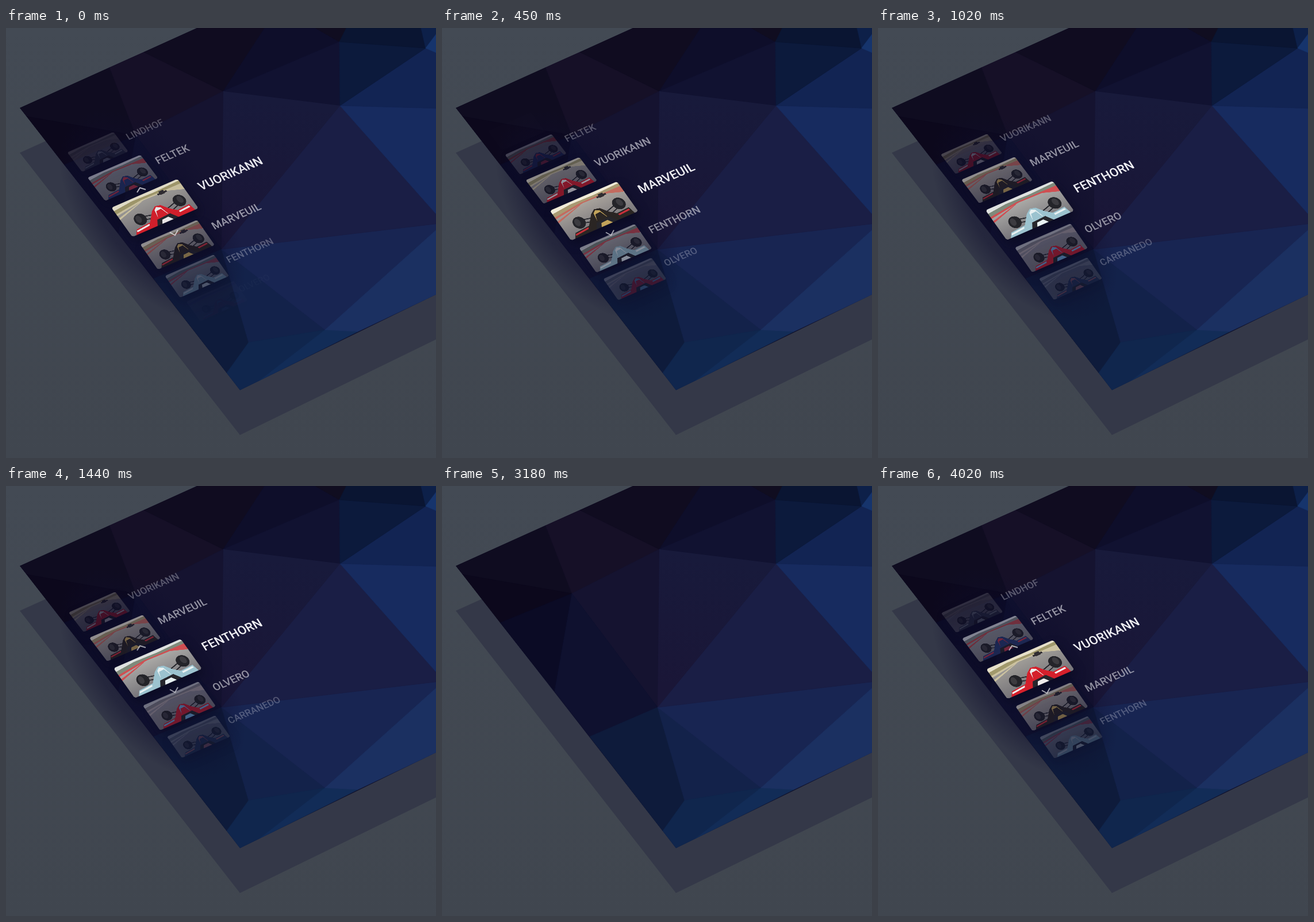
These frames come from a looping animation (748 px wide and 748 px high, 4.05 s). An HTML page with a canvas:

```html
<!DOCTYPE html>
<html lang="en">
<head>
<meta charset="utf-8">
<title>Driver picker</title>
<style>
  html, body { margin: 0; width: 100%; height: 100%; overflow: hidden; background: #414850; }
  canvas { display: block; width: 100vw; height: 100vh; }
</style>
</head>
<body>
<canvas id="stage" width="748" height="748"></canvas>
<script>
const SIZE = 748, LOOP = 4050, STEP = 30;
const ctx = document.getElementById('stage').getContext('2d');

// Corners of the low-poly backdrop
const P = {
  A: [24, 139], B: [332, 0], C: [180, 68], D: [240, 42], E: [226, 187],
  F: [378, 110], G: [450, 0], H: [580, 24], I: [581, 135], J: [730, 35],
  K: [762, 339], L: [375, 385], M: [101, 238], N: [196, 357], O: [257, 436],
  P: [422, 547], Q: [384, 600], R: [407, 630], S: [555, 525], T: [612, 528],
  U: [440, 614], V: [760, 458], W: [760, 140], X: [592, 0], Y: [722, 0],
  Z: [760, -5], a: [538, 0], b: [36, 154], c: [760, 48]
};
const FACETS = [
  ['ACEb', '#0f0c20'], ['bEM', '#0c081c'], ['CDFE', '#161027'], ['DBGF', '#100c20'],
  ['GaHF', '#0e0e2a'], ['aXH', '#100d20'], ['FHI', '#111231'], ['EFL', '#151330'],
  ['MEN', '#0b0b25'], ['ELON', '#0f112f'], ['OLPQ', '#0e1b3b'], ['LSP', '#13224a'],
  ['PSURQ', '#10264d'], ['UST', '#122c57'], ['LSK', '#182552'], ['ILK', '#1a1e45'],
  ['SKVT', '#1b3061'], ['IWK', '#172b5f'], ['IJcW', '#122453'], ['HJI', '#0c1a3c'],
  ['HXYJ', '#0a1532'], ['YZJ', '#0d2049'], ['JZc', '#16346c']
];

const DRIVERS = [
  { name: 'LINDHOF', sky: '#8a8a92', trees: '#5d5f68', band: '#77777c', road: '#66666d', car: '#3c4450', trim: '#8b969d' },
  { name: 'FELTEK', sky: '#d3d6dc', trees: '#7b8180', band: '#b4474a', road: '#8b8e94', car: '#26386f', trim: '#b8364a' },
  { name: 'VUORIKANN', sky: '#e9e3cc', trees: '#a39b6d', band: '#cfc5a2', road: '#a19e99', car: '#d8202b', trim: '#f2eeee', rival: 1 },
  { name: 'MARVEUIL', sky: '#f1ecd9', trees: '#a99a72', band: '#c46b5f', road: '#aaa49d', car: '#2a2523', trim: '#c3a45a', wing: '#c6303a', rival: 1 },
  { name: 'FENTHORN', sky: '#dfe2e0', trees: '#7f8a7b', band: '#cf4f52', road: '#aaa9a6', car: '#9cc3cf', trim: '#e8f1f2' },
  { name: 'OLVERO', sky: '#c5c7cc', trees: '#807f83', band: '#a99fa0', road: '#898790', car: '#c2202f', trim: '#6aa5d6' },
  { name: 'CARRANEDO', sky: '#b9bcc4', trees: '#777b83', band: '#a5a5aa', road: '#7d7f88', car: '#303d5e', trim: '#b9686c' }
];

// One entry per slot from -3 to 3: card corner, card axes, text start, type size, opacities
const SLOTS = [
  [81, 179, 73, -32, 23, 32, 172, 164, 15.6, 0, 0],
  [109, 220, 81, -36, 26, 34, 217, 198, 16.7, .27, .32],
  [145, 264, 93, -40, 31, 41, 269, 241, 18.4, .58, .58],
  [187, 317, 117, -51, 37, 52, 346, 287, 21.5, 1, 1],
  [238, 382, 97, -42, 30, 43, 364, 357, 18.4, .56, .56],
  [280, 436, 84, -37, 26, 37, 390, 414, 16.6, .27, .28],
  [317, 480, 82, -36, 24, 33, 410, 464, 15.6, 0, 0]
];

const clamp = x => Math.max(0, Math.min(1, x));
const ramp = (t, a, b) => clamp((t - a) / (b - a));
const easeOut = (p, n = 2) => 1 - Math.pow(1 - p, n);

function poly(c, pts, fill) {
  c.beginPath();
  pts.forEach(([x, y]) => c.lineTo(x, y));
  c.closePath();
  c.fillStyle = fill;
  c.fill();
}

function oval(c, x, y, rx, ry, fill, turn = 0) {
  c.beginPath();
  c.ellipse(x, y, rx, ry, turn, 0, Math.PI * 2);
  c.fillStyle = fill;
  c.fill();
}

function layer(w, h) {
  const cv = document.createElement('canvas');
  cv.width = w;
  cv.height = h;
  return [cv, cv.getContext('2d')];
}

function paintBackdrop() {
  const [cv, c] = layer(SIZE, SIZE);
  const wall = c.createLinearGradient(0, 0, 0, SIZE);
  wall.addColorStop(0, '#434a54');
  wall.addColorStop(1, '#40464f');
  c.fillStyle = wall;
  c.fillRect(0, 0, SIZE, SIZE);

  const sheet = [P.A, P.B, [760, -193], P.V, P.R];
  poly(c, sheet.map(([x, y]) => [x, y + 78]), '#343848');

  c.save();
  c.beginPath();
  sheet.forEach(([x, y]) => c.lineTo(x, y));
  c.clip();
  poly(c, sheet, '#10112c');
  for (const [keys, color] of FACETS) {
    poly(c, [...keys].map(k => P[k]), color);
    c.strokeStyle = color;
    c.lineWidth = .8;
    c.stroke();
  }
  const mid = c.createLinearGradient(440, 120, 400, 350);
  mid.addColorStop(0, '#181a3b');
  mid.addColorStop(1, '#1a1637');
  poly(c, [P.F, P.I, P.L], mid);
  c.restore();
  return cv;
}

// Soft flat onboard view, 320 by 180
function paintCard(d) {
  const [cv, c] = layer(320, 180);
  c.beginPath();
  c.roundRect(0, 0, 320, 180, 11);
  c.clip();
  c.fillStyle = d.sky;
  c.fillRect(0, 0, 320, 180);
  poly(c, [[0, 22], [90, 12], [200, 15], [320, 10], [320, 45], [0, 45]], d.trees);
  poly(c, [[0, 42], [130, 25], [320, 27], [320, 60], [0, 60]], d.band);
  const road = c.createLinearGradient(0, 30, 0, 180);
  road.addColorStop(0, d.road);
  road.addColorStop(1, '#77757a');
  poly(c, [[0, 52], [140, 31], [250, 34], [320, 62], [320, 180], [0, 180]], road);
  poly(c, [[0, 66], [122, 33], [128, 34], [0, 76]], d.band);
  if (d.rival) {
    c.fillStyle = '#302d31';
    c.fillRect(204, 29, 44, 9);
    c.fillRect(215, 21, 22, 20);
  }

  // Suspension, tyres and nose
  c.strokeStyle = '#24252b';
  c.lineWidth = 5;
  c.beginPath();
  [[82, 104, 150, 122], [84, 122, 145, 142], [268, 98, 200, 120], [268, 118, 204, 142]]
    .forEach(([x, y, X, Y]) => { c.moveTo(x, y); c.lineTo(X, Y); });
  c.stroke();
  oval(c, 76, 114, 27, 32, '#242429', .1);
  oval(c, 70, 110, 12, 20, '#3c3b40', .1);
  oval(c, 270, 105, 27, 32, '#242429', -.1);
  oval(c, 275, 101, 12, 20, '#3c3b40', -.1);
  poly(c, [[20, 180], [36, 154], [104, 148], [140, 100], [164, 82], [188, 88],
    [212, 122], [238, 146], [296, 142], [304, 180]], d.car);
  poly(c, [[152, 100], [166, 88], [182, 98], [194, 142], [146, 142]], d.trim);
  poly(c, [[156, 108], [180, 106], [192, 142], [146, 142]], d.car);
  poly(c, [[122, 180], [138, 150], [202, 146], [224, 180]], '#26262c');
  poly(c, [[146, 180], [156, 160], [186, 158], [200, 180]], d.trim);
  poly(c, [[34, 160], [98, 153], [94, 162], [31, 169]], d.wing || d.trim);
  poly(c, [[240, 152], [292, 148], [294, 157], [242, 161]], d.wing || d.trim);
  return cv;
}

const backdrop = paintBackdrop();
const cards = DRIVERS.map(paintCard);

function slotAt(rel) {
  const i = Math.min(5, Math.floor(rel + 3)), f = rel + 3 - i;
  return SLOTS[i].map((v, k) => v + (SLOTS[i + 1][k] - v) * f);
}

function scrollAt(t) {
  if (t >= 3300 || t < 490) {
    const since = t >= 4020 ? t - 4020 : t < 490 ? t + 30 : 0;
    return 1.975 + 1.025 * easeOut(clamp(since / 540));
  }
  return 3 + easeOut(ramp(t, 490, 1030));
}

function listAlpha(t) {
  if (t >= 3300) return easeOut(ramp(t, 3540, 3990), 1.6);
  return Math.pow(1 - ramp(t, 2190, 2970), 1.7);
}

function drawShade(alpha) {
  ctx.save();
  ctx.globalAlpha = alpha;
  ctx.translate(255, 325);
  ctx.rotate(.9);
  ctx.scale(1, .55);
  const g = ctx.createRadialGradient(0, 0, 40, 0, 0, 215);
  g.addColorStop(0, 'rgba(14,13,44,.55)');
  g.addColorStop(.6, 'rgba(14,13,44,.4)');
  g.addColorStop(1, 'rgba(14,13,44,0)');
  ctx.fillStyle = g;
  ctx.beginPath();
  ctx.arc(0, 0, 215, 0, 7);
  ctx.fill();
  ctx.restore();
}

function drawDriver(i, rel, alpha) {
  const [x, y, ux, uy, vx, vy, tx, ty, size, cardOn, textOn] = slotAt(rel);
  ctx.save();
  ctx.globalAlpha = alpha * cardOn;
  ctx.shadowColor = 'rgba(8,8,28,.6)';
  ctx.shadowBlur = 16;
  ctx.shadowOffsetX = 5;
  ctx.shadowOffsetY = 8;
  ctx.setTransform(ux / 320, uy / 320, vx / 180, vy / 180, x, y);
  ctx.drawImage(cards[i], 0, 0);
  ctx.restore();

  ctx.save();
  ctx.globalAlpha = alpha * textOn;
  ctx.setTransform(.917, -.4, .54, .84, tx, ty);
  ctx.font = `500 ${size}px Roboto, "Open Sans", sans-serif`;
  ctx.fillStyle = '#f2f2f6';
  ctx.fillText(DRIVERS[i].name, 0, 0);
  ctx.restore();
}

function drawChevron(pts, alpha) {
  if (alpha <= 0) return;
  ctx.globalAlpha = alpha;
  ctx.strokeStyle = '#e9e9ee';
  ctx.lineWidth = 2;
  ctx.beginPath();
  pts.forEach(([x, y]) => ctx.lineTo(x, y));
  ctx.stroke();
  ctx.globalAlpha = 1;
}

function drawChevrons(t) {
  const rest = .65 * ramp(t, 1200, 1440) + .15 * ramp(t, 1620, 2100);
  const late = rest * (1 - ramp(t, 2460, 2940));
  const early = t >= 3300 ? .7 * ramp(t, 3700, 4000) : .75 * (1 - ramp(t, 30, 180));
  const tap = .65 * ramp(t, 330, 430) * (1 - ramp(t, 480, 600));
  const shown = Math.max(early, late);
  const drop = t > 1000 && t < 3300 ? 0 : 1.5;
  drawChevron([[228, 286], [233, 278], [243, 281]], shown);
  drawChevron([[285, 354 + drop], [294, 359 + drop], [299, 350 + drop]], Math.max(shown, tap));
}

function draw(t) {
  ctx.drawImage(backdrop, 0, 0);
  const alpha = listAlpha(t);
  if (alpha > 0) {
    const s = scrollAt(t);
    drawShade(alpha);
    DRIVERS.map((_, i) => [i, i - s])
      .filter(([, rel]) => Math.abs(rel) < 3)
      .sort((a, b) => Math.abs(b[1]) - Math.abs(a[1]))
      .forEach(([i, rel]) => drawDriver(i, rel, alpha));
  }
  drawChevrons(t);
}

const start = performance.now();
function tick() {
  const t = (performance.now() - start) % LOOP;
  draw(Math.floor(t / STEP) * STEP);
  requestAnimationFrame(tick);
}
tick();
</script>
</body>
</html>
```
